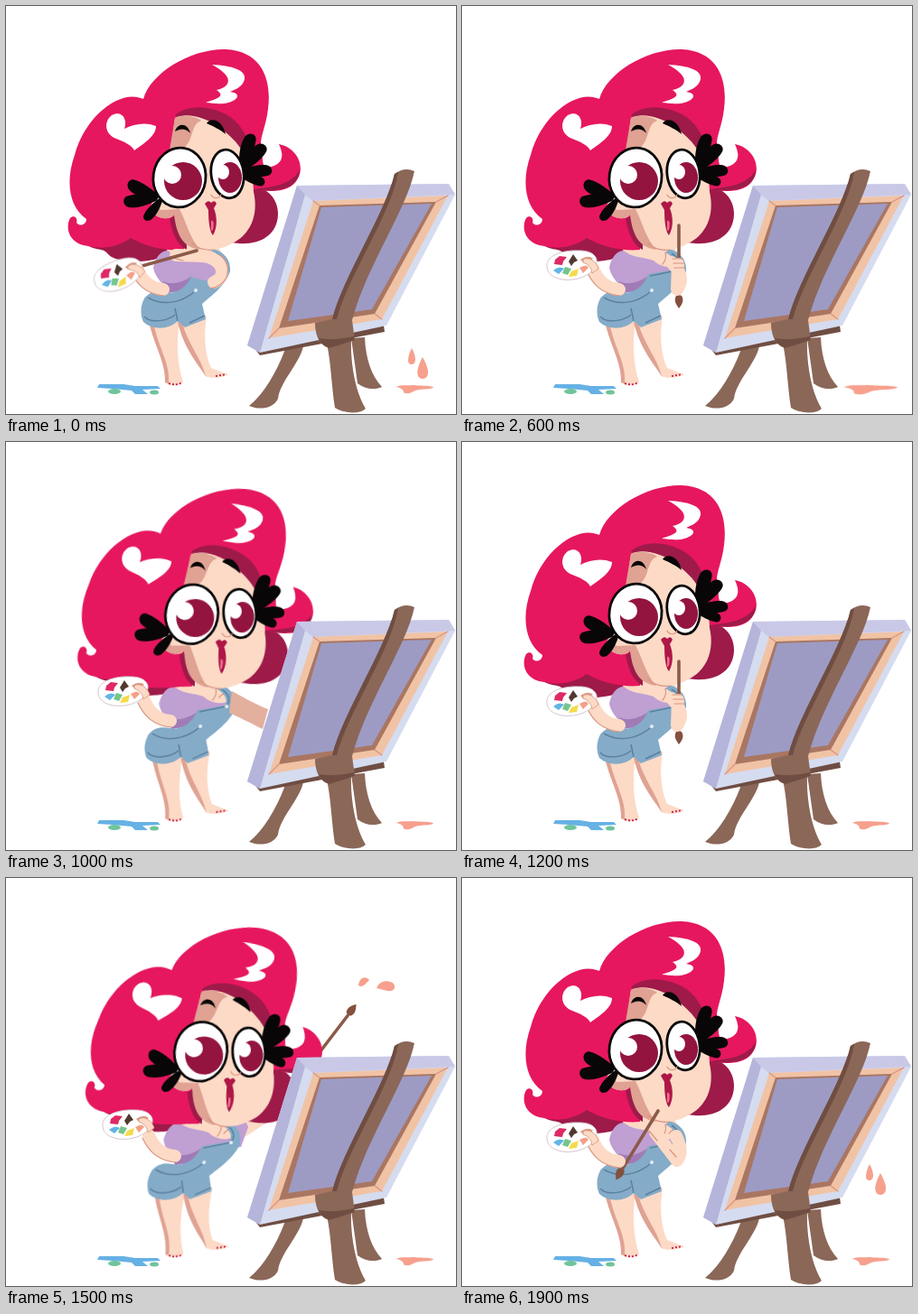
Write an HTML page that moves like this. It is 498 px wide and 452 px high and loops after 2 s.

```html
<!DOCTYPE html>
<html lang="en">
<head>
<meta charset="utf-8">
<title>Painter at the easel</title>
<style>
html, body { margin: 0; width: 100%; height: 100%; overflow: hidden; background: #fff; }
svg { display: block; width: 498px; height: 452px; }
svg * { transform-box: view-box; }
.move { animation: 2s step-end infinite; }

.pink { fill: #e6175f; }
.dark { fill: #9e1a49; }
.iris { fill: #93143f; }
.skin { fill: #fcdac6; }
.shade { fill: #dfa293; }
.shirt { fill: #c09fd3; }
.denim { fill: #84abc8; }
.seam { fill: none; stroke: #5b809f; stroke-width: 1.5; }
.wood { fill: #8b6758; }
.bark { fill: #6f4d42; }
.coral { fill: #f6a08d; }
.limb { fill: none; stroke: #fcdac6; stroke-width: 14; stroke-linecap: round; stroke-linejoin: round; }
.edge { fill: none; stroke: #d8947f; stroke-width: 1.2; stroke-linecap: round; }
.stick { fill: none; stroke: #8b5a4a; stroke-width: 3.6; stroke-linecap: round; }

/* Body leans with the head: upright, toward the canvas, stretched over it */
.head { transform-origin: 215px 265px; animation-name: head; }
@keyframes head {
  0%, 60%, 90% { transform: none; }
  35% { transform: translate(9px, 2px) rotate(3.5deg); }
  65% { transform: translate(17px, 4px) rotate(5deg); }
}
#body { transform-origin: 200px 420px; animation-name: body; }
@keyframes body {
  0%, 60%, 90% { transform: none; }
  35% { transform: skewX(-2.8deg); }
  65% { transform: skewX(-5deg); }
}
#palette { transform-origin: 121px 288px; animation-name: palette; }
@keyframes palette {
  0% { transform: translate(3px, 11px) rotate(-15deg); }
  20%, 60%, 90% { transform: none; }
  35% { transform: translate(8px, -11px); }
  65% { transform: translate(13px, -14px); }
}
#forearm { animation-name: forearm; }
@keyframes forearm {
  0%, 60%, 90% { transform: none; }
  35% { transform: translate(8px, -5px); }
  65% { transform: translate(13px, -6px); }
}

.leaning { animation-name: leaning; }
@keyframes leaning { 0%, 60%, 90% { opacity: 0; } 35%, 65% { opacity: 1; } }
.dip { animation-name: dip; }
@keyframes dip { 0% { opacity: 1; } 20%, 100% { opacity: 0; } }
.hold { animation-name: hold; }
@keyframes hold { 0%, 30% { opacity: 0; } 20%, 95%, 100% { opacity: 1; } }
.raise { animation-name: raise; }
@keyframes raise { 0%, 35%, 65%, 95% { opacity: 0; } 30%, 60%, 90% { opacity: 1; } }
.high { animation-name: high; }
@keyframes high { 0%, 45%, 60% { opacity: 0; } 35%, 55% { opacity: 1; } }
.low { animation-name: low; }
@keyframes low { 0%, 55% { opacity: 0; } 45% { opacity: 1; } }
.fling { animation-name: fling; }
@keyframes fling { 0%, 90% { opacity: 0; } 65% { opacity: 1; } }

#stir { transform-origin: 200px 273px; animation-name: stir; }
@keyframes stir { 0%, 10% { transform: none; } 5%, 15% { transform: rotate(-4deg); } }
#flick { transform-origin: 315px 235px; animation-name: flick; }
@keyframes flick {
  0%, 75% { transform: none; }
  65% { transform: translate(-30px, 45px) rotate(-8deg); }
  70% { transform: rotate(-8deg); }
  80% { transform: rotate(5deg); }
  85% { transform: translate(-25px, 40px); }
}

#splat { animation-name: splat; }
@keyframes splat {
  0%, 85% { opacity: 0; transform: none; }
  75% { opacity: 1; transform: none; }
  80% { opacity: 1; transform: translate(38px, 6px); }
}
#drops { animation-name: drops; }
@keyframes drops {
  0% { opacity: 1; transform: translate(-2px, 62px); }
  5% { opacity: 0; }
  85% { opacity: 1; transform: translate(12px, -145px); }
  90% { opacity: 1; transform: translate(4px, -65px); }
  95% { opacity: 1; transform: none; }
}
#puddle { transform-origin: 453px 421px; animation-name: puddle; }
@keyframes puddle {
  0%, 40% { transform: none; }
  5% { transform: scale(1.2, 1.1); }
  10% { transform: scale(1.55, 1.2); }
  15%, 20% { transform: scale(1.8, 1.25); }
  25% { transform: scale(1.72, 1.2); }
  30% { transform: scale(1.45, 1.15); }
  35% { transform: scale(1.15, 1.05); }
}
</style>
</head>
<body>
<svg viewBox="0 0 498 452" aria-label="A painter dips her brush, paints and flings colour over the canvas">
  <defs>
    <path id="petal" d="M0 -3C10 -7 22 -9 31 -7C39 -5 39 5 32 6C22 8 10 6 0 3Z"/>
    <path id="bristle" d="M-3 0C-6 6 -3 9 0 14C4 9 6 5 3 0Z" fill="#84503f"/>
  </defs>

  <!-- Floor paint -->
  <path fill="#66b1e5" d="M103 419H130L143 421H168L171 424L151 425L157 430H143L139 426L118 424L101 423Z"/>
  <g fill="#70c49b"><ellipse cx="120" cy="427" rx="7" ry="3"/><ellipse cx="164" cy="428" rx="5" ry="2.5"/></g>
  <path id="puddle" class="move coral" d="M432 422C438 419 444 421 450 420C459 421 466 420 473 422C472 425 463 424 458 425C451 425 450 430 442 429C437 428 444 425 432 422Z"/>

  <!-- Arm reaching over the canvas -->
  <g class="move fling">
    <path class="limb" d="M256 284L302 254"/>
    <path class="shirt" d="M238 274C252 260 264 264 268 276L260 298L242 300Z"/>
    <g id="flick" class="move">
      <path class="stick" d="M325 222L380 150"/>
      <use href="#bristle" transform="translate(379 151) rotate(218)"/>
    </g>
  </g>

  <!-- Hair behind the body -->
  <path class="move head dark" d="M88 262C94 272 108 267 112 274C122 285 136 279 142 283C160 284 175 278 195 270L190 235Z"/>

  <g id="body" class="move">
    <path class="skin" d="M157 345L192 348C188 375 190 400 196 416C193 422 179 421 176 417C177 394 163 375 157 345Z"/>
    <path class="skin" d="M188 345L222 343C218 368 221 388 227 401L245 408C242 412 226 413 220 410C213 390 196 376 188 345Z"/>
    <path class="shade" d="M157 345L163 350C168 378 182 395 180 418L176 417C177 394 163 375 157 345ZM190 350L195 351C201 374 216 390 221 410C212 396 197 380 190 350Z"/>
    <path fill="none" stroke="#c92952" stroke-width="2" stroke-dasharray="2 2" d="M180 418Q188 421 195 417M232 410L244 408"/>
    <path class="skin" d="M180 262L230 258L244 284L230 298L174 290Z"/>
    <path class="shirt" d="M163 290C165 278 172 271 179 271C188 279 201 278 212 282C220 290 234 291 240 287L241 298L227 313L178 318C176 307 166 304 163 290Z"/>
    <path fill="#a07bb6" d="M174 305C187 311 201 303 209 297L206 313L178 318Z"/>
    <path class="edge" d="M222 286Q227 280 225 273M229 283Q233 278 237 279"/>
    <path class="denim" d="M153 324C160 315 169 315 181 318C196 316 202 307 206 297L236 292C240 284 233 277 225 273L230 269C243 273 249 283 248 294C244 309 226 322 217 330L221 347L198 356L190 349C180 359 162 359 152 350C148 341 149 332 153 324Z"/>
    <path class="seam" d="M157 323C176 334 196 327 208 317M190 349L187 335M153 344C160 352 179 349 187 342M203 351L220 343M208 299L237 293C243 288 240 279 232 274"/>
    <g fill="#e6edf2"><circle cx="210" cy="315" r="2"/><circle cx="238" cy="293" r="2"/></g>
  </g>

  <g class="move head">
    <path class="dark" d="M248 205C280 192 301 207 301 231C300 258 274 268 244 261Z"/>
    <path class="move leaning pink" d="M85 256C92 263 98 263 106 265C118 277 170 276 198 268L190 225Z"/>
    <path class="pink" d="M152 103C160 74 205 47 243 48C285 50 294 84 290 114C288 132 282 143 282 153C285 166 282 181 290 179C305 176 309 168 302 153C322 157 331 177 323 191C315 207 293 207 270 202L198 210L197 270C179 272 155 267 138 257C124 267 106 270 91 266C70 264 65 246 71 235C75 231 80 235 78 240C82 245 89 242 89 236C69 222 66 193 76 165C87 123 126 91 152 103Z"/>
    <path class="dark" d="M187 121C204 107 233 111 252 126C268 139 279 172 272 208L240 170ZM325 182C324 204 297 207 274 203C296 200 314 199 325 182ZM181 236L200 225V270C190 266 184 252 181 236Z"/>
    <path class="skin" d="M187 124C198 118 222 122 239 137C262 153 274 178 274 206C280 232 270 254 250 263C232 274 206 273 196 258C190 250 189 240 186 231C180 240 160 234 160 222L180 175Z"/>
    <path class="shade" d="M187 124C196 120 209 122 216 127C204 131 208 149 197 157L181 159ZM160 222C162 234 177 240 186 231C189 258 199 268 215 270C203 257 200 240 192 225L172 226Z"/>

    <path fill="#fff" d="M117 121C128 115 135 125 131 136C141 131 154 128 166 133C166 144 153 152 142 160C139 154 130 150 122 147C109 142 108 128 117 121ZM228 65C250 66 266 71 264 81C262 90 254 92 248 95C261 97 257 104 246 107C236 110 228 107 221 107C235 102 243 100 233 93C251 89 251 77 228 65Z"/>

    <g fill="#080607">
      <use href="#petal" transform="translate(168 213) rotate(208)"/>
      <use href="#petal" transform="translate(167 212) rotate(172)"/>
      <use href="#petal" transform="translate(171 215) rotate(128) scale(.75)"/>
      <use href="#petal" transform="translate(261 177) rotate(-72)"/>
      <use href="#petal" transform="translate(261 181) rotate(-46)"/>
      <use href="#petal" transform="translate(261 185) rotate(-5) scale(.9)"/>
      <use href="#petal" transform="translate(260 187) rotate(20) scale(.75)"/>
      <path d="M187 139C190 129 201 129 204 141C198 135 193 136 187 139ZM222 130C227 122 240 127 243 142C237 137 231 134 222 130Z"/>
    </g>
    <g fill="#fff" stroke="#080607" stroke-width="2.8">
      <ellipse cx="192" cy="190" rx="29" ry="33" transform="rotate(8 192 190)"/>
      <ellipse cx="245" cy="186" rx="18" ry="27" transform="rotate(-8 245 186)"/>
    </g>
    <g class="iris"><circle cx="196" cy="194" r="21"/><ellipse cx="248" cy="190" rx="13" ry="17"/></g>
    <g fill="#fff"><circle cx="184" cy="187" r="10"/><ellipse cx="240" cy="184" rx="7" ry="8"/></g>
    <path class="edge" d="M227 209C229 214 236 214 238 209M206 263Q216 272 230 270"/>
    <circle cx="253" cy="211" r="1.6"/>
    <path fill="#ae1746" d="M220 219Q224 214 227 218Q231 214 233 219L230 224C234 234 234 246 229 254C225 250 224 236 224 226Z"/>
    <path fill="#ef6f91" d="M227 238Q231 236 229 248L227 249Z"/>
  </g>

  <!-- Brush arm poses -->
  <g class="move dip">
    <path class="shirt" d="M195 282Q220 268 236 285L228 306L207 301Z"/>
    <path class="limb" d="M230 306C246 300 240 279 218 277L188 276"/>
    <path class="edge" d="M226 313C247 309 251 289 238 276M181 278L196 282"/>
    <g id="stir" class="move">
      <path class="stick" d="M211 271L147 289"/>
      <use href="#bristle" transform="translate(148 289) rotate(66)"/>
    </g>
  </g>
  <g class="move hold">
    <path class="stick" d="M217 258L177 323"/>
    <use href="#bristle" transform="translate(177 322) rotate(28)"/>
    <path class="limb" d="M237 286C244 300 242 308 238 313L214 282"/>
    <path class="edge" d="M207 280L216 291M230 301L237 309"/>
  </g>
  <g class="move raise">
    <path class="stick" d="M240 243V322"/>
    <use href="#bristle" transform="translate(240 321)"/>
    <path class="limb" d="M232 284C242 294 245 304 238 314L239 286"/>
    <path class="edge" d="M233 280H244M234 285H246M235 290H246"/>
  </g>
  <g class="move high">
    <path class="stick" d="M274 235L299 266"/>
    <path class="limb" d="M253 292C256 300 268 300 279 292L302 268"/>
    <path class="edge" d="M249 298C257 311 274 307 286 296"/>
  </g>
  <path class="move low" fill="#e3b09d" d="M250 276C262 282 276 291 290 296L284 318C270 311 256 304 247 300Z"/>

  <!-- Palette -->
  <g id="forearm" class="move">
    <path class="limb" d="M174 314C160 313 150 304 145 291"/>
    <path class="edge" d="M138 294C145 309 155 319 175 321"/>
  </g>
  <g id="palette" class="move">
    <path fill="#fff" stroke="#d4c6ce" d="M94 288C93 276 113 270 130 271C146 271 153 280 147 289C142 299 127 305 111 303C100 301 94 296 94 288Z"/>
    <path fill="#df2864" d="M103 281L108 277L116 278L112 283L111 287L102 286Z"/>
    <path fill="#52392f" d="M118 283L123 275L128 282L124 284L121 288Z"/>
    <path fill="#d99a83" d="M131 281Q140 275 145 280L135 285Z"/>
    <path fill="#62b5e5" d="M101 293Q107 287 113 291L107 297Z"/>
    <path fill="#75c58d" d="M114 289L121 291L117 298L111 296Z"/>
    <path fill="#f4db4b" d="M121 294L129 291L127 299L118 300Z"/>
    <path fill="#f4a088" d="M130 290Q138 285 140 290L134 296Z"/>
    <path class="skin" stroke="#d8947f" stroke-width=".8" d="M134 281C140 277 149 283 151 291L144 296Q143 287 134 284Z"/>
  </g>

  <!-- Easel -->
  <path class="wood" d="M309 380L329 377C325 396 304 415 301 435C296 446 281 448 269 443C285 430 299 407 309 380Z"/>
  <path class="wood" d="M382 368L397 367C398 390 404 409 416 422C408 426 396 424 389 418Z"/>
  <path class="bark" d="M274 378L418 354L419 361L281 387Z"/>
  <path fill="#d5dcf0" d="M322 199L490 197L497 209L421 354L281 384L267 376Z"/>
  <path fill="#c9c9e7" d="M322 199L490 197L497 209L340 216L331 209Z"/>
  <path fill="#b5b4da" d="M322 199L331 209L281 384L267 376Z"/>
  <path fill="#f1c3a5" d="M340 216L489 210L416 347L291 368Z"/>
  <path fill="#a97662" d="M347 221L476 217L408 341L302 357Z"/>
  <path fill="#9d9bc4" d="M349 223L471 219L405 336L312 349Z"/>
  <path class="edge" d="M340 216L347 221M489 210L476 217M291 368L302 357M416 347L408 341"/>
  <path class="wood" d="M355 374L382 369C381 400 388 430 398 446C391 453 373 451 364 445C360 420 360 397 355 374Z"/>
  <path class="wood" d="M430 186Q441 178 452 183C443 226 400 286 383 348L386 370L358 379C346 376 342 363 342 351L361 347C373 300 420 229 430 186Z"/>
  <path class="bark" d="M430 186L434 184C427 229 378 300 366 347L361 347C373 300 420 229 430 186ZM346 368Q365 371 385 366L386 370L358 379Q349 376 346 368Z"/>

  <!-- Flying paint -->
  <path id="splat" class="move coral" d="M390 119C391 110 398 108 402 113C398 117 395 122 390 119ZM410 122C413 114 423 112 429 117C433 124 426 127 418 124Z"/>
  <g id="drops" class="move coral">
    <path d="M451 317C456 326 457 335 450 335C445 334 447 325 451 317Z"/>
    <path d="M463 327C470 339 472 350 463 351C454 350 457 338 463 327Z"/>
  </g>
</svg>
</body>
</html>
```
